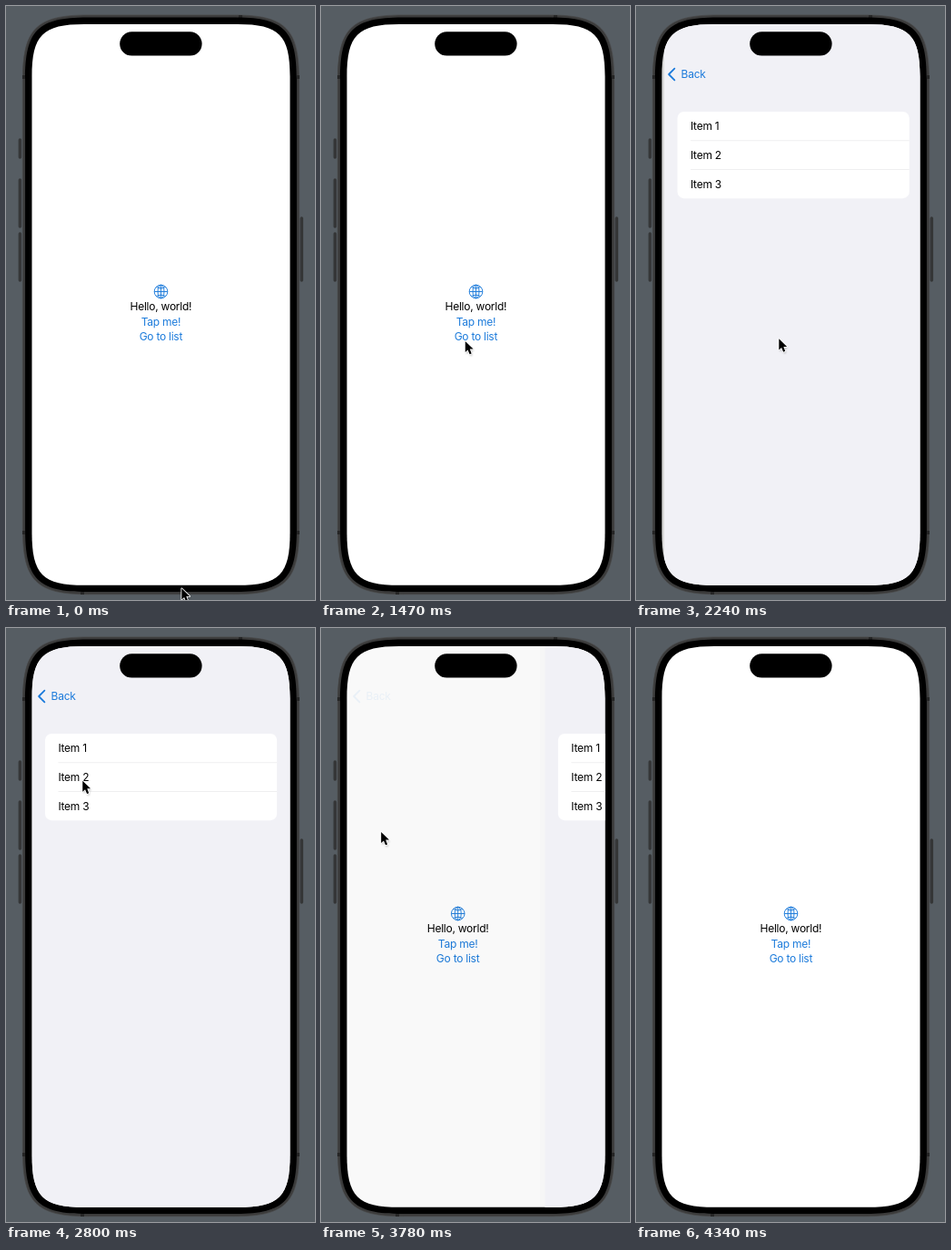
An HTML page for the animation above (5.25 s loop, 340x652 px).

```html
<!DOCTYPE html>
<html lang="en">
<head>
<meta charset="utf-8">
<title>Push navigation</title>
<style>
html, body { margin: 0; width: 100%; height: 100%; overflow: hidden; background: #565d63; }
svg { display: block; width: 100%; height: 100%; }
text { font: 12px Inter, "Liberation Sans", sans-serif; letter-spacing: -.25px; }
.mid { text-anchor: middle; }
.link { fill: #1c7bdb; }
.line { fill: none; stroke: #1c7bdb; }
.key { stroke: #353637; stroke-width: 3.5; stroke-linecap: round; }
</style>
</head>
<body>
<svg viewBox="0 0 340 652">
  <defs>
    <clipPath id="screen"><path id="glass"/></clipPath>
    <filter id="soft" x="-50%" y="-50%" width="200%" height="200%"><feGaussianBlur stdDeviation="1"/></filter>
    <path id="arrow" d="M0 0V13L3 10.3 5.2 15.5 7.4 14.5 5.4 9.3H9.5Z"/>
  </defs>

  <!-- phone body -->
  <path class="key" d="M15.4 147V166M15.4 191V242M15.4 250V301M325.3 233V301"/>
  <path id="band" fill="#3b3b3b" stroke="#484848" stroke-width=".7"/>
  <path d="M256 11.5h4M82 644.5h4M19.5 76v4M321.5 76v4M19.5 576v4M321.5 576v4" stroke="#262626" stroke-width="3"/>
  <path id="bezel"/>

  <g clip-path="url(#screen)">
    <rect width="340" height="652" fill="#fff"/>
    <g id="home">
      <g class="line" stroke-width=".95">
        <circle cx="170.5" cy="313.5" r="7.3"/>
        <ellipse cx="170.5" cy="313.5" rx="3.5" ry="7.3"/>
        <path d="M170.5 306.2v14.6M163.2 313.5h14.6M165.2 308.6q5.3 2.6 10.6 0M165.2 318.4q5.3 -2.6 10.6 0"/>
      </g>
      <text class="mid" x="170.4" y="334.4">Hello, world!</text>
      <text class="mid link" x="170.4" y="350.6">Tap me!</text>
      <text class="mid link" id="go" x="170.4" y="366.8">Go to list</text>
    </g>
    <rect id="dim" width="340" height="652"/>
    <g id="list">
      <rect id="edge" x="23" width="5.5" height="652"/>
      <rect x="28.5" width="285" height="652" fill="#f1f1f6"/>
      <rect x="43" y="115.9" width="255.1" height="95.3" rx="7.2" fill="#fff"/>
      <path d="M57.5 147.7H298.1M57.5 179.5H298.1" stroke="#e8e8ea" stroke-width=".7"/>
      <text x="57.4" y="136.3">Item 1</text>
      <text x="57.4" y="168.1">Item 2</text>
      <text x="57.4" y="199.9">Item 3</text>
    </g>
    <g id="back">
      <path class="line" d="M42.4 68.6 36.1 75 42.4 81.4" stroke-width="1.8" stroke-linecap="round" stroke-linejoin="round"/>
      <text class="link" x="49.6" y="79.3">Back</text>
    </g>
  </g>
  <rect x="125.2" y="28.3" width="90.4" height="26.2" rx="13.1"/>

  <g id="cursor">
    <g transform="translate(.3 .3) scale(.93)">
      <use href="#arrow" x="1" y="2" opacity=".3" filter="url(#soft)"/>
      <use href="#arrow" fill="#fff" stroke="#fff" stroke-width="1.8" stroke-linejoin="round"/>
      <use href="#arrow"/>
    </g>
  </g>
</svg>
<script>
const LOOP = 5250, TICK = 70, WIDTH = 284, PARALLAX = 85;
const PUSH = 1960, TAP_BACK = 3570, POP = 3640;

const el = id => document.getElementById(id);
const [home, go, dim, list, edge, back, cursor] =
  ["home", "go", "dim", "list", "edge", "back", "cursor"].map(el);
const clamp = v => Math.max(0, Math.min(1, v));
const shift = (node, x, y = 0) => node.setAttribute("transform", `translate(${x} ${y})`);
const fade = (node, v) => node.setAttribute("opacity", v);

// rounded rectangle with continuous corners, grown outwards from the glass
function shell(node, grow) {
  const r = 39.7 + grow, w = WIDTH + 2 * grow, h = 615.7 + 2 * grow;
  const far = 1.45 * r, near = 0.298 * r, run = far - near;
  node.setAttribute("d", `M${28.5 - grow + far} ${20 - grow}h${w - 2 * far}
    c${run} 0 ${far} ${near} ${far} ${far}v${h - 2 * far}
    c0 ${run} ${-near} ${far} ${-far} ${far}h${2 * far - w}
    c${-run} 0 ${-far} ${-near} ${-far} ${-far}v${2 * far - h}
    c0 ${-run} ${near} ${-far} ${far} ${-far}z`);
}
shell(el("glass"), 0);
shell(el("bezel"), 7.4);
shell(el("band"), 10.1);

// distance left in a critically damped spring
function spring(ms) {
  const x = ms * 0.01766;
  return (1 + x) * Math.exp(-x);
}

function pushed(t) {
  if (t < PUSH) return 0;
  return t < POP ? 1 - spring(t - PUSH + 102) : spring(t - POP + 18);
}

function backOpacity(t) {
  if (t < PUSH) return 0;
  return t < TAP_BACK ? 1 : 0.2 * clamp(1 - (t - POP) / 210);
}

function pointer(t) {
  let x = 193, y = 639;
  const glide = (from, to, toX, toY) => {
    const k = 1 - (1 - clamp((t - from) / (to - from))) ** 1.3;
    x += (toX - x) * k;
    y += (toY - y) * k;
  };
  glide(70, 210, 203, 690);
  glide(210, 700, 164, 325);
  glide(840, 1000, 163, 376);
  glide(1190, 1610, 157, 365);
  glide(2450, 3060, 48, 70);
  glide(POP, 4340, 119, 680);
  return [x, y];
}

function draw(t) {
  const p = pushed(t);
  shift(home, -PARALLAX * p);
  shift(list, WIDTH * (1 - p));
  list.style.display = p > 0.003 ? "" : "none";
  fade(dim, 0.1 * p);
  fade(edge, 0.055 * p);
  fade(go, t < PUSH ? 1 : clamp(0.4 + (t - PUSH) / 470));
  fade(back, backOpacity(t));
  shift(cursor, ...pointer(t));
}

const start = performance.now();
function frame() {
  const t = (performance.now() - start) % LOOP;
  draw(Math.floor(t / TICK) * TICK);
  requestAnimationFrame(frame);
}
frame();
</script>
</body>
</html>
```
